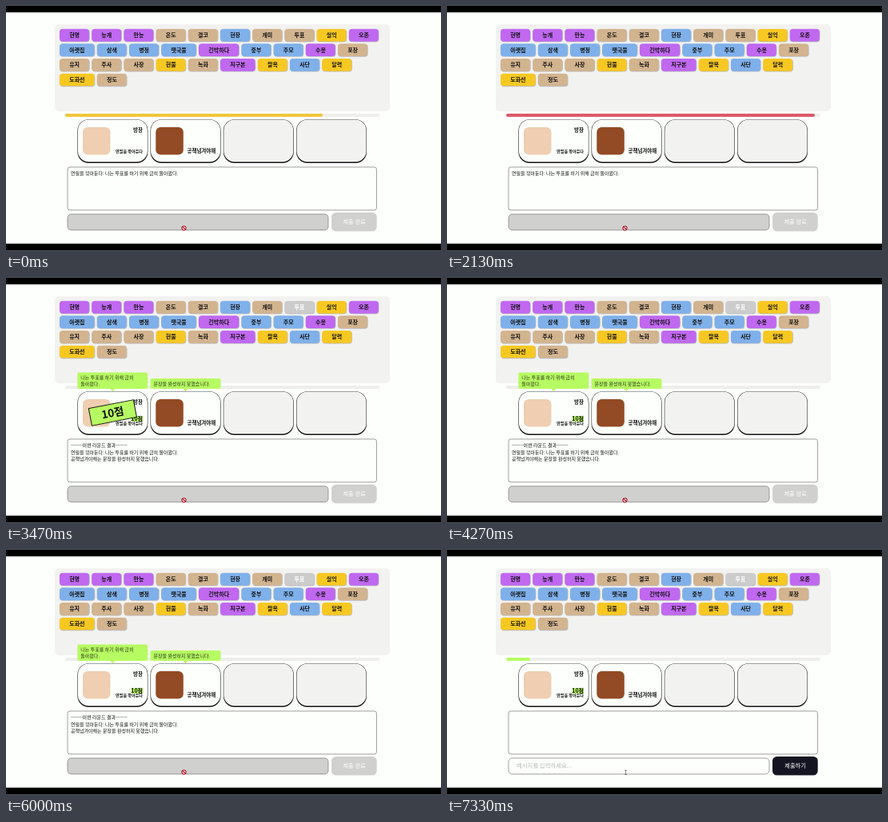
These frames come from a looping animation (544x306 px, 7.39 s). An HTML page with a canvas:

```html
<!DOCTYPE html>
<html lang="ko">
<head>
<meta charset="utf-8">
<style>
  html, body { margin: 0; width: 100%; height: 100%; overflow: hidden; background: #000; }
  canvas { display: block; width: 544px; height: 306px; }
</style>
</head>
<body>
<canvas id="stage" width="544" height="306"></canvas>
<script>
const ctx = document.getElementById('stage').getContext('2d');
const FONT = '"Noto Sans CJK KR", "Noto Sans CJK", sans-serif';
const LOOP = 7390, RESULT = 2800, STAMP_END = 4130, NEXT_ROUND = 6270;
const LIME = '#b7fb62', PANEL = '#f2f2f0', PAPER = '#fdfffc';
const SPEED = 0.0301; // progress bar, px per ms
const BAR = { x: 74, y: 135, w: 393, h: 4 };
const COLORS = { P: '#c068f0', T: '#d2b48f', B: '#7fb0ea', Y: '#f7c822' };
const ROWS = [
  'P현명 P능개 P만능 T온도 T결코 B현장 T개미 T투표 Y실익 P오존',
  'B아랫집 B삼색 B병정 B땟국물 P긴박하다 B중부 B주모 P수용 T포장',
  'T유지 T주사 T사장 Y현물 T녹화 P지구본 Y팔목 B사단 Y달력',
  'Y도화선 T정도'
].map(row => row.split(' '));
const USED_WORD = '투표';
const HOST = '연필을 깎아둔다', GUEST = '공책넘겨야해';
const SENTENCE = '나는 투표를 하기 위해 급히 돌아왔다.';
const FAILED = '문장을 완성하지 못했습니다.';

const clamp = v => Math.max(0, Math.min(1, v));
const mix = (a, b, p) => a + (b - a) * p;
const gray = v => `rgb(${v},${v},${v})`;

function box(x, y, w, h, r, fill, stroke, line = 0.7) {
  ctx.beginPath();
  ctx.roundRect(x, y, w, h, r);
  if (fill) { ctx.fillStyle = fill; ctx.fill(); }
  if (stroke) { ctx.strokeStyle = stroke; ctx.lineWidth = line; ctx.stroke(); }
}

// y is the vertical centre of the glyphs
function text(str, x, y, size, { weight = 400, align = 'left', color = '#111' } = {}) {
  ctx.font = `${weight} ${size}px ${FONT}`;
  ctx.textAlign = align;
  ctx.textBaseline = 'alphabetic';
  ctx.fillStyle = color;
  ctx.fillText(str, x, y + size * 0.37);
}

function drawWords(t) {
  box(61, 23, 419, 109, 5, PANEL);
  const fade = clamp((t - RESULT) / 670);
  ROWS.forEach((row, i) => {
    let x = 66.9;
    const y = 28.7 + i * 18.65;
    for (const item of row) {
      const word = item.slice(1), w = 24.2 + word.length * 6.6;
      const used = word === USED_WORD && t >= RESULT;
      box(x + 0.4, y + 0.5, w, 16, 4, '#b9bcc4');
      box(x, y, w - 0.3, 15.7, 4, used ? gray(mix(122, 204, fade)) : COLORS[item[0]]);
      text(word, x + w / 2, y + 7.9, 7, {
        weight: 900, align: 'center', color: used ? gray(mix(185, 255, fade)) : '#111'
      });
      x += w + 2.8;
    }
  });
}

function drawBar(t) {
  box(BAR.x, BAR.y, BAR.w, BAR.h, 2, '#eeeeec');
  let w = 0;
  if (t < RESULT) w = 322 + t * SPEED;
  else if (t >= NEXT_ROUND) w = (t - NEXT_ROUND - 63) * SPEED;
  if (w <= 0) return;
  const part = Math.min(1, w / BAR.w);
  const color = part > 0.9 ? '#dc5a6b' : part > 0.5 ? '#f0c63c' : LIME;
  box(BAR.x, BAR.y, part * BAR.w, BAR.h, 2, color);
}

function drawCard(x, fill) {
  box(x, 142.2, 88, 54.8, 14, '#111');
  box(x + 0.5, 142.6, 87, 52.9, 13.5, fill);
}

function drawPlayers(t) {
  for (let i = 0; i < 4; i++) drawCard(89.4 + i * 91.2, i < 2 ? PAPER : PANEL);
  box(96, 152, 34.5, 34.5, 6, '#efceb1');
  box(187.3, 152, 34.5, 34.5, 6, '#924b24');
  const bold = { weight: 700, align: 'right' };
  text('방장', 171, 156, 6.5, bold);
  if (t >= RESULT) {
    box(156.5, 173, 14.5, 7, 0, LIME);
    text('10점', 171, 176.2, 7, bold);
  }
  text(HOST, 171, 182.3, 5.1, bold);
  text(GUEST, 262.3, 182, 6.5, bold);
}

function drawBubble(x, y, lines) {
  box(x, y, 88, 139 - y, 2, LIME);
  ctx.beginPath();
  ctx.moveTo(x + 41, 139);
  ctx.lineTo(x + 47, 139);
  ctx.lineTo(x + 44, 142);
  ctx.fill();
  lines.forEach((line, i) => text(line, x + 4, y + 6.6 + i * 8, 6, { color: '#26301c' }));
}

function drawStamp(t) {
  const p = clamp((t - RESULT) / 200);
  const scale = 1 - (1 - p) ** 3;
  if (!scale) return;
  ctx.save();
  ctx.translate(133.4, 169);
  ctx.rotate(-0.192);
  ctx.scale(scale, scale);
  box(-28.5, -11, 57, 22, 0, LIME, '#111', 1);
  text('10점', 0, 0, 13.5, { weight: 800, align: 'center' });
  ctx.restore();
}

function drawChat(t) {
  box(77, 202, 386.5, 54, 3, PAPER, '#777');
  if (t >= NEXT_ROUND) return;
  const said = `${HOST}: ${SENTENCE}`;
  const lines = t < RESULT ? [said] : ['-------이번 라운드 결과-------', said, `${GUEST}는 ${FAILED}`];
  lines.forEach((line, i) => text(line, 81, 209.8 + i * 8.6, 6));
}

function drawForm(open) {
  box(77, 261, 326, 20, 4.5, open ? PAPER : '#d0d0cf', '#777');
  box(407, 259, 56.7, 23.6, 5.5, open ? '#151522' : '#d0d0cf');
  if (open) text('메시지를 입력하세요...', 87, 270.7, 7.4, { color: '#b9b9b9' });
  text(open ? '제출하기' : '제출 완료', 435.6, 270.8, 7.25, { weight: 500, align: 'center', color: '#fff' });
}

function drawPointer(open) {
  ctx.beginPath();
  if (open) {
    ctx.moveTo(222, 276.4); ctx.lineTo(225, 276.4);
    ctx.moveTo(223.5, 276.4); ctx.lineTo(223.5, 281.6);
    ctx.moveTo(222, 281.6); ctx.lineTo(225, 281.6);
    ctx.strokeStyle = '#444';
    ctx.lineWidth = 0.6;
  } else {
    ctx.arc(222.5, 278.6, 2.6, 0, Math.PI * 2);
    ctx.fillStyle = '#f3dede';
    ctx.fill();
    ctx.moveTo(220.7, 276.8); ctx.lineTo(224.3, 280.4);
    ctx.strokeStyle = '#b3202c';
    ctx.lineWidth = 1.1;
  }
  ctx.stroke();
}

function draw(t) {
  const open = t >= NEXT_ROUND;
  ctx.fillStyle = '#000';
  ctx.fillRect(0, 0, 544, 306);
  ctx.fillStyle = PAPER;
  ctx.fillRect(0, 8, 544, 290);
  drawWords(t);
  drawBar(t);
  drawPlayers(t);
  if (t >= RESULT && !open) {
    drawBubble(89.3, 118.5, [SENTENCE.slice(0, 15), SENTENCE.slice(16)]);
    drawBubble(180.5, 126, [FAILED]);
    if (t < STAMP_END) drawStamp(t);
  }
  drawChat(t);
  drawForm(open);
  drawPointer(open);
}

const start = performance.now();
function tick() {
  draw((performance.now() - start) % LOOP);
  requestAnimationFrame(tick);
}
tick();
</script>
</body>
</html>
```
